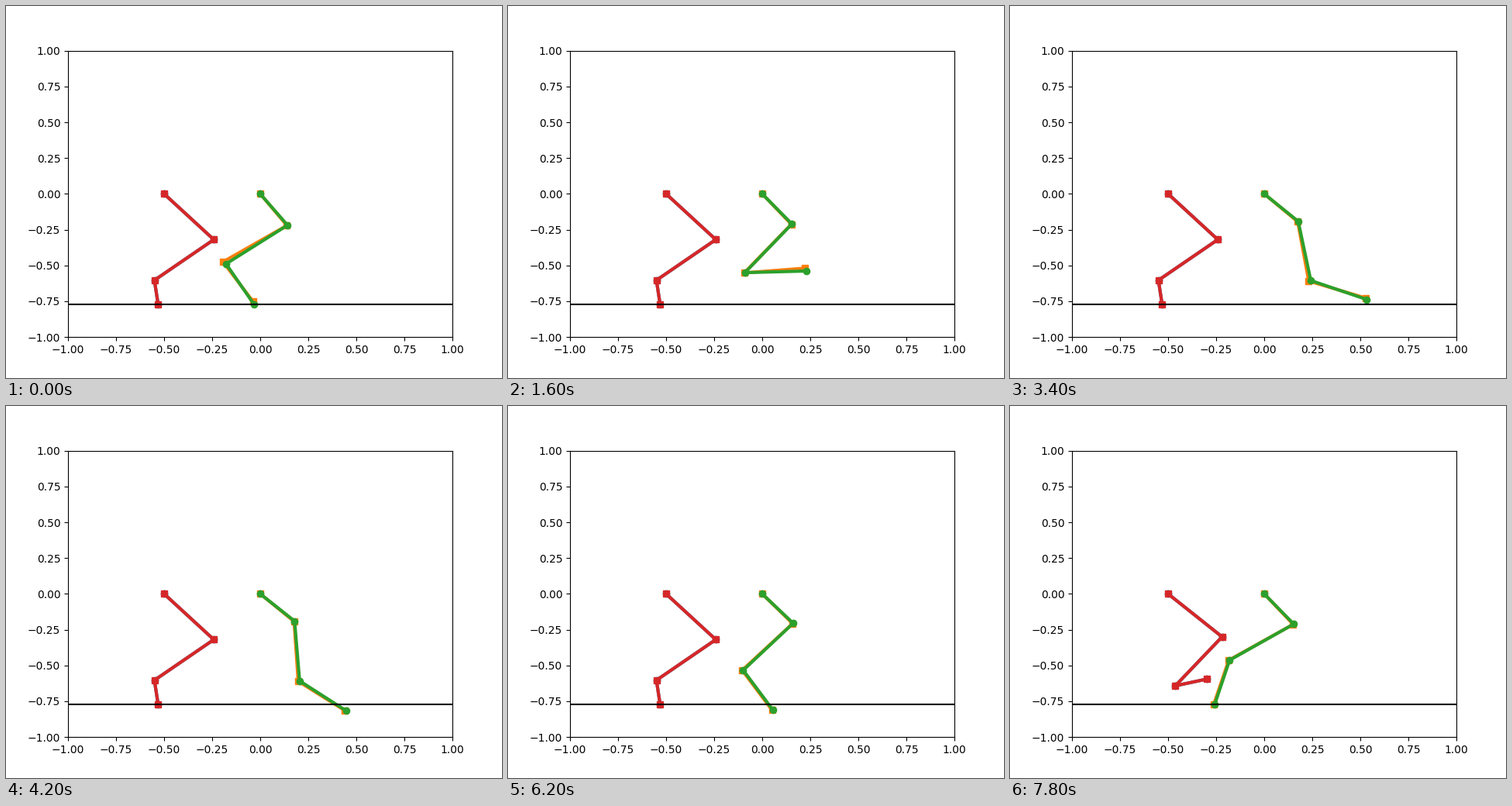
These frames come from a looping animation (640x480 px, 8 s). A matplotlib script:

```python
import numpy as np
import matplotlib.pyplot as plt
from matplotlib.animation import FuncAnimation

FRAMES, INTERVAL = 40, 200
GROUND = -0.772

# Link lengths: thigh, shank, foot
FRONT = (0.261, 0.4185, 0.3185)
HIND = (0.411, 0.4195, 0.170)

# Standing pose: hip angle in degrees, toe x and y relative to the hip
FRONT_REST = np.array([-57.0, -0.032, GROUND])
HIND_REST = np.array([-51.0, -0.031, GROUND])
FRONT_START, HIND_START = 1, 31
HIND_STRIDE = np.array([1, 0.78, 0.78])


def step(t):
    """Change of hip angle, toe x and toe y, t frames into a step."""
    t = max(t, 0)
    hip = 4.4 * (1 - np.cos(np.pi * t / 18.5)) + 0.08 * t
    # Forward swing blends into the backward stance
    swing, stance, blend = 0.0372 * t, 1.264 - 0.0392 * t, 0.07
    x = -blend * np.logaddexp(-swing / blend, -stance / blend)
    # One damped wave: the foot lifts, sinks below ground and settles
    phase = min(np.pi * t / 17.5, 2 * np.pi)
    y = 0.397 * np.exp(-0.0688 * t) * np.sin(phase)
    return np.array([hip, x, y])


def lead(t):
    """Offset of the commanded leg: lifted a little more in the swing."""
    return np.array([-0.8, -0.005, 0.02 * np.clip((20 - t) / 8, 0, 1)])


def leg(pose, links, hip_x):
    """Joint positions from hip angle and toe, the ankle bent backwards."""
    thigh, shank, foot = links
    angle = np.radians(pose[0])
    knee = thigh * np.array([np.cos(angle), np.sin(angle)])
    toe = pose[1:]
    gap = toe - knee
    dist = np.hypot(*gap)
    u = gap / dist
    along = (dist ** 2 + shank ** 2 - foot ** 2) / (2 * dist)
    side = np.sqrt(max(shank ** 2 - along ** 2, 0))
    ankle = knee + along * u + side * np.array([u[1], -u[0]])
    joints = np.array([(0, 0), knee, ankle, toe])
    return joints[:, 0] + hip_x, joints[:, 1]


fig, ax = plt.subplots(figsize=(6.4, 4.8), dpi=100)
ax.set_xlim(-1, 1)
ax.set_ylim(-1, 1)

hind_sim, = ax.plot([], [], "o-", color="C0", lw=3)
front_cmd, = ax.plot([], [], "s-", color="C1", lw=3)
front_sim, = ax.plot([], [], "o-", color="C2", lw=3)
hind_cmd, = ax.plot([], [], "s-", color="C3", lw=3)
ax.axhline(GROUND, color="black")


def update(frame):
    t = frame - FRONT_START
    front = FRONT_REST + step(t)
    hind = HIND_REST + HIND_STRIDE * step(frame - HIND_START)
    front_sim.set_data(*leg(front, FRONT, 0))
    front_cmd.set_data(*leg(front + lead(t), FRONT, 0))
    for line in (hind_sim, hind_cmd):
        line.set_data(*leg(hind, HIND, -0.5))
    return hind_sim, front_cmd, front_sim, hind_cmd


anim = FuncAnimation(fig, update, frames=FRAMES, interval=INTERVAL,
                     repeat=True, repeat_delay=0)
plt.show()
```
